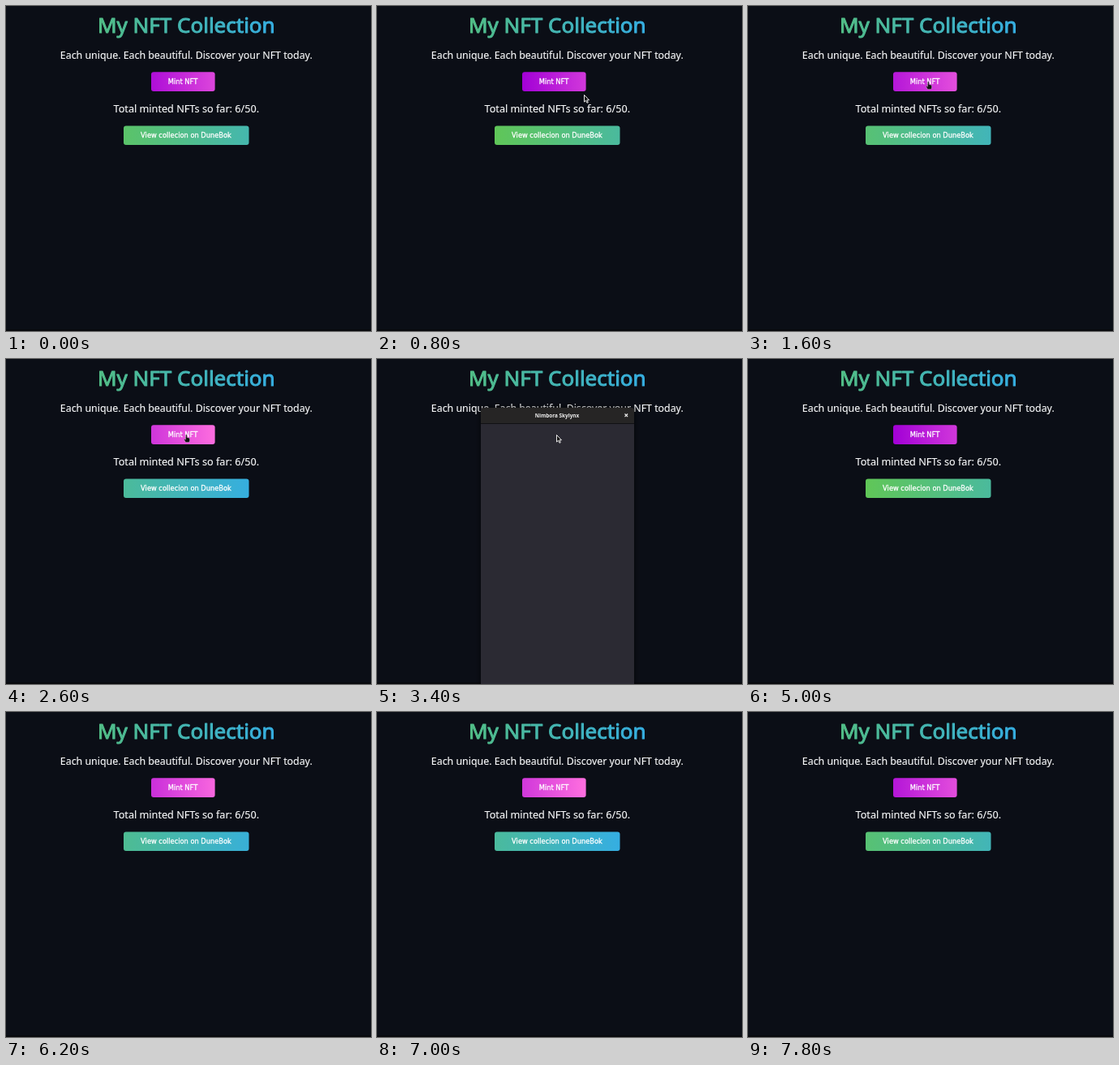
Write an HTML page with a canvas that moves like this. It is 450 px wide and 400 px high and loops after 8 s.

```html
<!DOCTYPE html>
<html lang="en">
<head>
<meta charset="utf-8">
<title>NFT collection</title>
<style>
  html, body { margin: 0; width: 100%; height: 100%; overflow: hidden; background: #0b0e16; }
  canvas { display: block; }
</style>
</head>
<body>
<canvas id="stage" width="450" height="400"></canvas>
<script>
const ctx = document.getElementById('stage').getContext('2d');
const LOOP = 8000, STEP = 200;
const WINDOW_OPEN = 3200, WINDOW_CLOSE = 4600;
const SANS = '"Noto Sans", sans-serif';
const BUTTON_FONT = '8.27px "DejaVu Sans", sans-serif';

const pointerPath = [
  [400, 421, 187], [600, 340, 148], [800, 256, 109], [1000, 222, 93],
  [3800, 222, 93], [4400, 262, 380], [4600, 262, 400]
];

// The standard CSS "ease" curve, cubic-bezier(.25, .1, .25, 1).
function ease(x) {
  const bezier = (a, b, s) => 3 * a * s * (1 - s) ** 2 + 3 * b * s * s * (1 - s) + s ** 3;
  let low = 0, high = 1;
  for (let i = 0; i < 20; i++) {
    const mid = (low + high) / 2;
    if (bezier(.25, .25, mid) < x) low = mid; else high = mid;
  }
  return bezier(.1, 1, low);
}

// Gradient position: 0 to 1 in two seconds, then back.
function gradientShift(t) {
  const x = ((t - 1100 + LOOP) % 4000) / 2000;
  return x < 1 ? ease(x) : 1 - ease(x - 1);
}

function gradient(x0, x1, from, to) {
  const g = ctx.createLinearGradient(x0, 0, x1, 0);
  g.addColorStop(0, from);
  g.addColorStop(1, to);
  return g;
}

function text(str, x, y, font, fill, outline = 0) {
  ctx.font = font;
  ctx.fillStyle = ctx.strokeStyle = fill;
  ctx.textAlign = 'center';
  ctx.lineJoin = 'round';
  ctx.fillText(str, x, y);
  if (!outline) return;
  ctx.lineWidth = outline;
  ctx.strokeText(str, x, y);
}

function roundBox(x, y, w, h, radii, fill) {
  ctx.beginPath();
  ctx.roundRect(x, y, w, h, radii);
  ctx.fillStyle = fill;
  ctx.fill();
}

function button(label, x, y, w, h, from, to, shift) {
  const start = x - shift * w;
  roundBox(x, y, w, h, 3, gradient(start, start + 2 * w, from, to));
  text(label, x + w / 2 - .3, y + 14.3, BUTTON_FONT, '#fff', .3);
}

function drawPage(t) {
  const shift = gradientShift(t);
  ctx.fillStyle = '#0b0e16';
  ctx.fillRect(0, 0, 450, 400);
  ctx.fillStyle = '#08090d';
  ctx.fillRect(0, 398, 450, 2);
  text('My NFT Collection', 222.3, 33.3, `26px ${SANS}`, gradient(2, 332, '#60c657', '#35aee2'), 1);
  text('Each unique. Each beautiful. Discover your NFT today.', 222.3, 65, `12.37px ${SANS}`, '#f6f7f8', .15);
  text('Total minted NFTs so far: 6/50.', 222.3, 131, `12.65px ${SANS}`, '#f6f7f8', .15);
  button('Mint NFT', 179, 81.3, 78.6, 23.6, '#a200d6', '#ff6fdf', shift);
  button('View collecion on DuneBok', 145, 147.5, 154.5, 23.6, '#60c657', '#35aee2', shift);
}

function drawWindow() {
  ctx.save();
  ctx.shadowColor = 'rgba(0,0,0,.7)';
  ctx.shadowBlur = 7;
  roundBox(128, 60, 189, 345, [4, 4, 0, 0], '#2b2a33');
  ctx.restore();
  roundBox(128, 60, 189, 19, [4, 4, 0, 0], '#262525');
  ctx.fillStyle = '#111114';
  ctx.fillRect(128, 79, 189, 1);
  text('Nimbora Skylynx', 222, 72.3, `700 6.4px ${SANS}`, '#eee');
  ctx.strokeStyle = '#eee';
  ctx.lineWidth = 1.2;
  ctx.stroke(new Path2D('M305.5 67.5l3.6 3.6m0-3.6l-3.6 3.6'));
}

const arrow = new Path2D('M0 0V8.5L2 6.8L3.5 9.8L4.8 9.2L3.4 6.3H6Z');
const hand = new Path2D('M0 0Q1 -1 1.6 0V3L5 4V7.5L4 9H0L-2 5.5L-1.5 4.8L0 5.8Z');

function drawPointer(t, overButton) {
  const next = pointerPath.findIndex(p => p[0] > t);
  if (next < 1) return;
  const [t0, x0, y0] = pointerPath[next - 1], [t1, x1, y1] = pointerPath[next];
  const k = (t - t0) / (t1 - t0);
  const shape = overButton ? hand : arrow;
  ctx.save();
  ctx.translate(x0 + (x1 - x0) * k - .5, y0 + (y1 - y0) * k + .5);
  ctx.fillStyle = '#111';
  ctx.strokeStyle = overButton ? 'rgba(255,255,255,.3)' : '#fff';
  ctx.lineWidth = .9;
  ctx.fill(shape);
  ctx.stroke(shape);
  ctx.restore();
}

function draw(now) {
  const t = Math.floor((now % LOOP) / STEP) * STEP;
  const windowOpen = t >= WINDOW_OPEN && t < WINDOW_CLOSE;
  drawPage(t);
  if (windowOpen) drawWindow();
  drawPointer(t, t >= 1000 && !windowOpen);
  requestAnimationFrame(draw);
}
requestAnimationFrame(draw);
</script>
</body>
</html>
```
